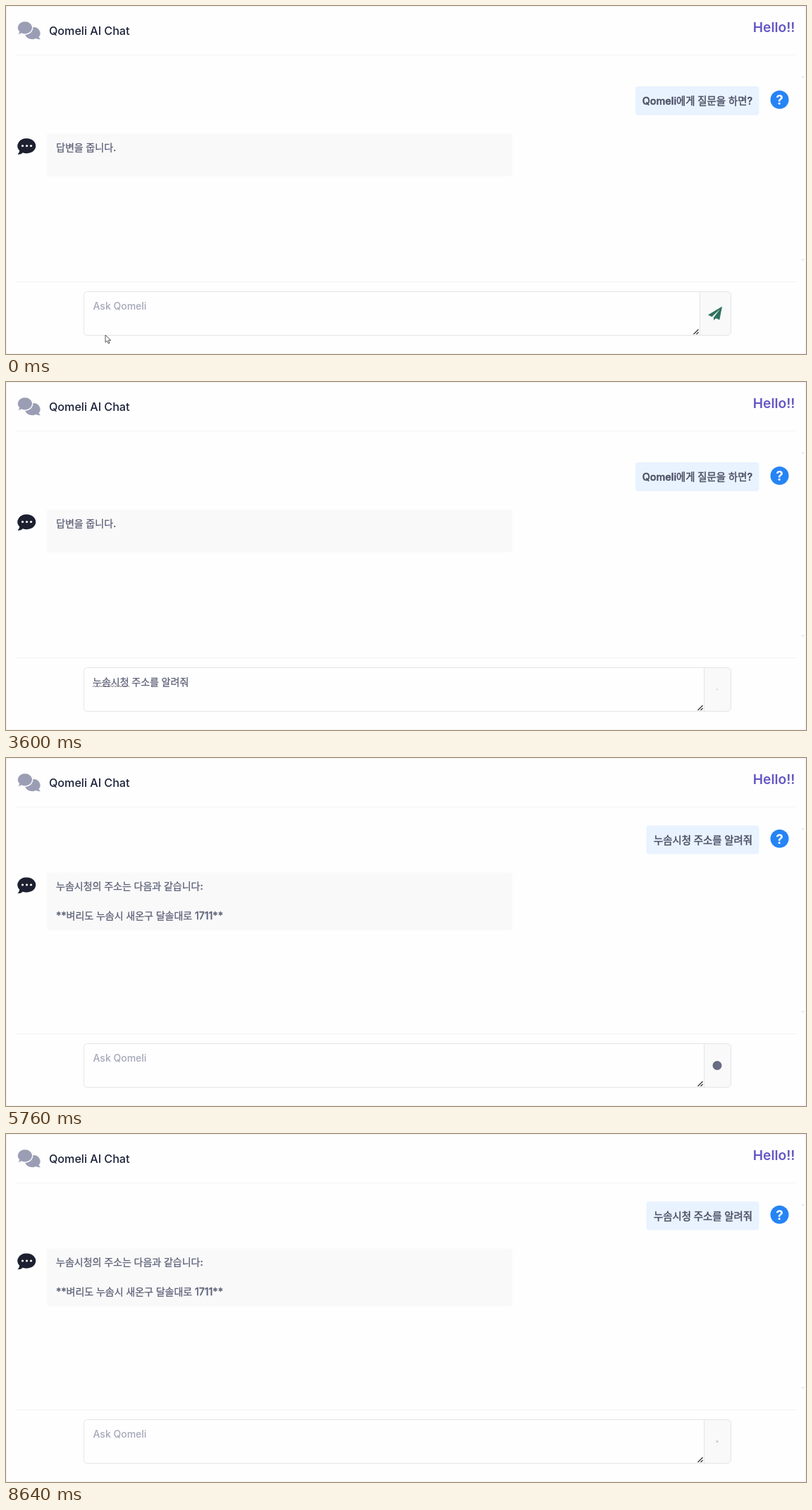
These frames come from a looping animation (1135x494 px, 8720 ms). An HTML page:

```html
<!DOCTYPE html>
<html lang="ko">
<head>
<meta charset="utf-8">
<title>AI Chat</title>
<style>
  html, body { margin: 0; width: 100%; height: 100%; overflow: hidden; background: #f6f6f6; }
  svg { display: block; width: 1135px; height: 494px; }
  text { font: 500 14px Inter, 'Noto Sans CJK KR', sans-serif; fill: #5e6278; white-space: pre; }
  .title { font-size: 16.1px; fill: #1b2238; }
  .hello { font-size: 19.2px; font-weight: 600; fill: #6257c3; text-anchor: end; }
  /* A hairline stroke gives the Hangul glyphs a medium weight. */
  .body { stroke: #5e6278; stroke-width: .3px; }
  .question { font-size: 14.4px; fill: #4a4e62; stroke: #4a4e62; stroke-width: .45px; text-anchor: end; }
  .mark { font-size: 19px; font-weight: 700; fill: #fff; text-anchor: middle; }
  .placeholder { fill: #a5a8ba; }
  .rule { stroke: #f3f3f4; }
</style>
</head>
<body>
<svg viewBox="0 0 1135 494">
  <rect x=".5" y=".5" width="1134" height="493" rx="6" fill="#fefefe" stroke="#f0f0f1"/>
  <path class="rule" d="M14 69.5H1120M14 391.5H1120"/>
  <path d="M1128 102l2.5-3 2.5 3zM1128 359l2.5 3 2.5-3z" fill="#e9e9e9"/>

  <g fill="#9b9db4">
    <path d="M39 30a9.800 8.700 0 0 1 7.500 14q1 2 2.500 3.200-3.500.5-6.200-1.200a10.500 8.700 0 1 1-3.800-16z"/>
    <path stroke="#fefefe" stroke-width="1.400" d="M27 21.500a10.800 9.300 0 1 1-5 17.600q-2.700 1.900-6 1.400 1.900-1.600 2.500-3.900A10.800 9.300 0 0 1 27 21.500z"/>
  </g>
  <text class="title" x="61" y="41">Qomeli AI Chat</text>
  <text class="hello" x="1119.500" y="37">Hello!!</text>

  <rect id="questionBox" height="41" rx="4" fill="#e9f3ff"/>
  <text id="question" class="question" x="1059"></text>
  <rect id="answerBox" x="57.500" width="661" rx="4" fill="#f9f9f9"/>
  <text id="answer" class="body" x="71"></text>
  <text id="answerMore" class="body" x="71" y="228.500"></text>
  <g id="badges">
    <circle cx="1097.500" cy="133" r="13" fill="#2684f5"/>
    <text class="mark" x="1097.500" y="140">?</text>
    <path fill="#1c2030" d="M29.500 188a12.800 10.600 0 1 1-5.500 20.200q-3 2.700-7.500 2.500 2.300-2.400 2.800-5.300A12.800 10.600 0 0 1 29.500 188z"/>
    <g fill="#fff">
      <circle cx="23.500" cy="198.500" r="1.600"/><circle cx="29.500" cy="198.500" r="1.600"/><circle cx="35.500" cy="198.500" r="1.600"/>
    </g>
  </g>

  <path id="addon" fill="#f9f9f9"/>
  <rect id="inputBox" x="110.500" y="405.500" width="918" height="62" rx="5" fill="none"/>
  <path id="divider" stroke="#e2e4ea"/>
  <path id="grip" d="M975.500 466l7-7M979.500 466l3-3" stroke="#333" stroke-width="1.200" fill="none"/>
  <text id="placeholder" class="placeholder" x="123.500" y="430.500">Ask Qomeli</text>
  <text id="typed" class="body" x="123" y="430.500"></text>
  <path id="squiggle" fill="none" stroke="#8c7f8a"/>
  <path id="caret" stroke="#333"/>
  <path id="plane" fill="#2f705f" d="M1016 426.500L996 438.500l5.500 2.800 11.500-11-9 12v4l3-3 5.300 2.200z"/>
  <circle id="spinner" cx="1009" cy="436.500" fill="#5b617a"/>
  <path id="pointer" d="M0 0v10.500l2.500-2.300 1.800 4 1.700-.8-1.700-3.800h3.400z" fill="#fff" stroke="#444" stroke-width=".9"/>
</svg>
<script>
const LOOP = 8720, STEP = 80;
const TYPE_START = 160, TYPE_RATE = 74, SEND = 1660, REPLY = 5280, PULSE = 627;
const PROMPT = '누솜시청 주소를 알려줘';
const INTRO = { question: 'Qomeli에게 질문을 하면?', answer: '답변을 줍니다.', more: '', left: 893, height: 61, dy: 0 };
const RESULT = {
  question: PROMPT, answer: '누솜시청의 주소는 다음과 같습니다:',
  more: '**벼리도 누솜시 새온구 달솔대로 1711**', left: 908.5, height: 82, dy: -18.5
};
// time, x, y
const POINTER = [[960, 1013, 467], [1200, 1013, 467], [1520, 1002, 436], [2720, 1002, 436], [3200, 1008, 500]];

const el = Object.fromEntries([...document.querySelectorAll('[id]')].map(node => [node.id, node]));
const set = (node, attrs) => Object.entries(attrs).forEach(([key, value]) => node.setAttribute(key, value));
const show = (node, visible) => node.setAttribute('visibility', visible ? 'visible' : 'hidden');

function pointerAt(t) {
  if (t < TYPE_START) return [141, 467];
  const i = POINTER.findIndex(p => p[0] > t);
  if (i < 1) return null;
  const [t0, x0, y0] = POINTER[i - 1], [t1, x1, y1] = POINTER[i];
  const u = (t - t0) / (t1 - t0), k = u * u * (3 - 2 * u);
  return [x0 + (x1 - x0) * k, y0 + (y1 - y0) * k];
}

function drawChat(chat) {
  const { dy } = chat;
  set(el.questionBox, { x: chat.left, y: 114 + dy, width: 1068.5 - chat.left });
  set(el.question, { y: 140 + dy });
  set(el.answerBox, { y: 181 + dy, height: chat.height });
  set(el.answer, { y: 205.5 + dy });
  set(el.badges, { transform: `translate(0 ${dy})` });
  el.question.textContent = chat.question;
  el.answer.textContent = chat.answer;
  el.answerMore.textContent = chat.more;
}

function drawInput(t) {
  const sent = t >= SEND, replied = t >= REPLY;
  const focused = t >= TYPE_START && !sent;
  const count = replied ? 0 : Math.max(0, Math.floor((t - TYPE_START) / TYPE_RATE));
  const text = PROMPT.slice(0, count);
  const edge = sent ? 990.5 : 984.5;

  el.typed.textContent = text;
  show(el.placeholder, !text);
  show(el.squiggle, text.length > 4);
  show(el.caret, focused);
  const end = 123 + (text ? el.typed.getComputedTextLength() : 0);
  set(el.caret, { d: `M${Math.round(end) + .5} 417v16` });

  set(el.inputBox, { stroke: focused ? '#d2d3d9' : '#e4e5eb' });
  set(el.addon, { d: `M${edge} 405.500H1024q4.500 0 4.500 5V463q0 4.500-4.500 4.500H${edge}z` });
  set(el.divider, { d: `M${edge} 406V467` });
  set(el.grip, { transform: `translate(${sent ? 6 : 0} 0)` });
  show(el.plane, !sent);
  show(el.spinner, sent);

  // The dot grows while fading in, then fades out at full size.
  const phase = ((t - SEND) / PULSE + 10) % 1;
  set(el.spinner, {
    r: 6.5 * Math.min(1, phase * 2),
    opacity: 1 - Math.abs(phase * 2 - 1)
  });
}

function draw(t) {
  drawChat(t < REPLY ? INTRO : RESULT);
  drawInput(t);
  const position = pointerAt(t);
  show(el.pointer, position);
  if (position) set(el.pointer, { transform: `translate(${position})` });
}

set(el.squiggle, { d: 'M123 433' + 'l2-2 2 2'.repeat(13) });

function frame() {
  draw(Math.floor(performance.now() % LOOP / STEP) * STEP);
  requestAnimationFrame(frame);
}
frame();
</script>
</body>
</html>
```
